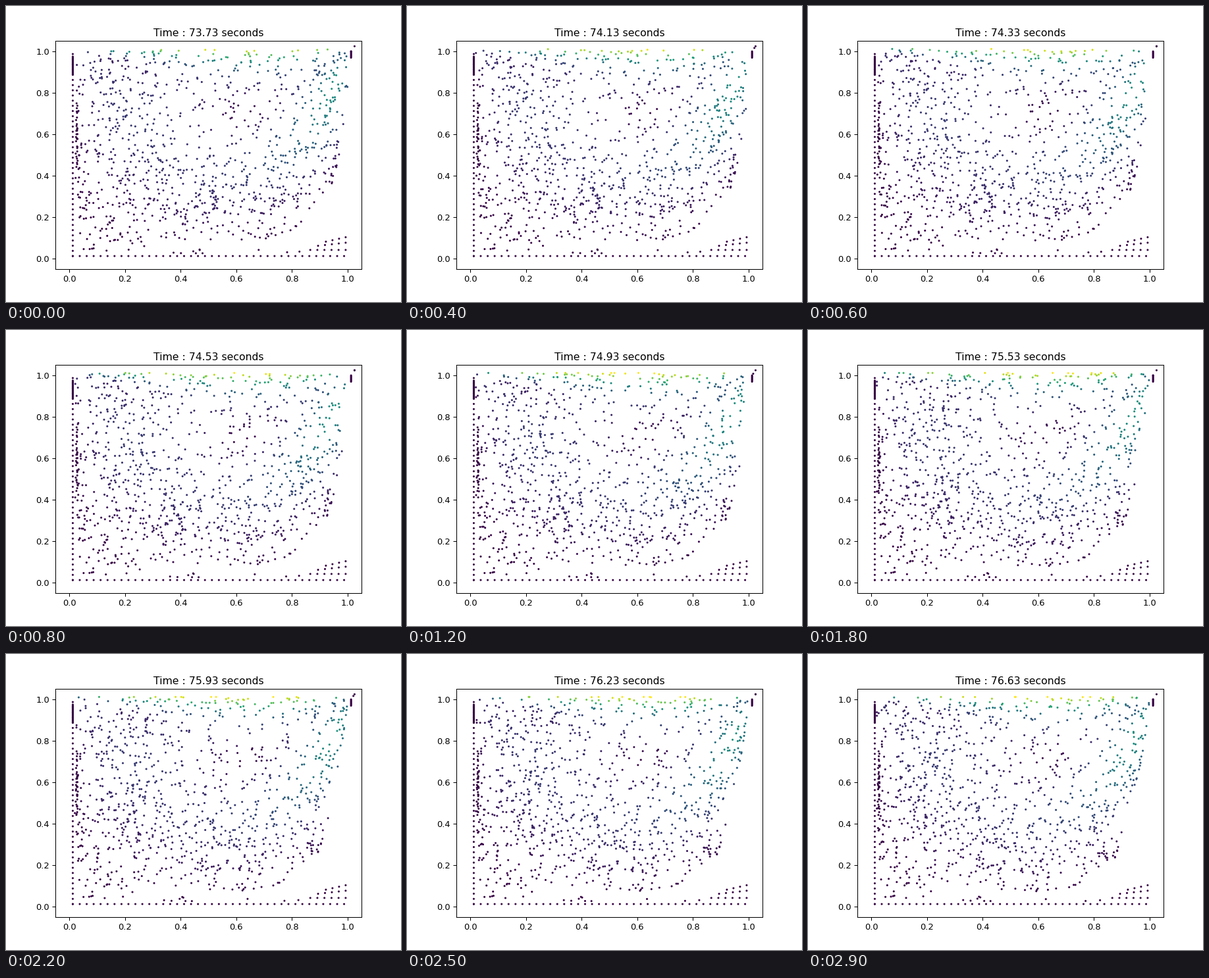
A matplotlib script for the animation above (3000 ms loop, 600 by 450 pixels).

```python
import numpy as np
import matplotlib.pyplot as plt
from matplotlib.animation import FuncAnimation
from matplotlib.colors import ListedColormap

FRAMES, INTERVAL = 30, 100
START_TIME, STEP = 73.73, 0.1
SIZE = 1.025        # side of the cavity
LID = 0.9           # lid speed, units per second
REYNOLDS = 170
N = 48              # grid cells per side

rng = np.random.default_rng(7)


def solve_cavity(steps=4000, dt=0.006):
    """Stream function and velocity of a unit lid-driven cavity."""
    h = 1 / N
    k = np.arange(1, N)
    sines = np.sin(np.pi * np.outer(k, k) / N)
    lam = (2 - 2 * np.cos(np.pi * k / N)) / h**2
    inverse = (2 / N) ** 2 / (lam[:, None] + lam[None, :])
    psi = np.zeros((N + 1, N + 1))
    w = np.zeros_like(psi)
    for _ in range(steps):
        psi[1:-1, 1:-1] = sines @ ((sines @ w[1:-1, 1:-1] @ sines) * inverse) @ sines
        w[0] = -2 * psi[1] / h**2
        w[-1] = -2 * psi[-2] / h**2 - 2 / h
        w[:, 0] = -2 * psi[:, 1] / h**2
        w[:, -1] = -2 * psi[:, -2] / h**2
        u = (psi[2:, 1:-1] - psi[:-2, 1:-1]) / (2 * h)
        v = -(psi[1:-1, 2:] - psi[1:-1, :-2]) / (2 * h)
        east, west = w[1:-1, 2:], w[1:-1, :-2]
        north, south = w[2:, 1:-1], w[:-2, 1:-1]
        mid = w[1:-1, 1:-1]
        spread = (east + west + north + south - 4 * mid) / (REYNOLDS * h**2)
        carry = (u * (east - west) + v * (north - south)) / (2 * h)
        w[1:-1, 1:-1] = mid + dt * (spread - carry)
    full_u, full_v = np.zeros_like(psi), np.zeros_like(psi)
    full_u[1:-1, 1:-1], full_v[1:-1, 1:-1] = u, v
    full_u[-1, 1:-1] = 1
    return psi / psi.min(), full_u, full_v


def sample(field, pos):
    """Bilinear lookup at positions in plot units."""
    q = np.clip(pos / SIZE, 0, 0.99999) * N
    i = q.astype(int)
    fx, fy = (q - i).T
    x, y = i.T
    low = field[y, x] * (1 - fx) + field[y, x + 1] * fx
    high = field[y + 1, x] * (1 - fx) + field[y + 1, x + 1] * fx
    return low * (1 - fy) + high * fy


PSI, U, V = solve_cavity()


def velocity(pos):
    return LID * np.column_stack([sample(U, pos), sample(V, pos)])


def points(x, y):
    return np.column_stack(np.broadcast_arrays(x, y)).astype(float)


def scatter_box(n, x0, x1, y0, y1):
    return points(rng.uniform(x0, x1, n), rng.uniform(y0, y1, n))


def seed_particles():
    """Random particles, thinned by how far in the vortex they lie."""
    pos = scatter_box(1450, 0.022, 1.0, 0.025, 1.01)
    x, y = pos.T
    psi = sample(PSI, pos)
    keep = np.where(psi > 0.55, 0.4, 0.95)
    keep[psi < 0.1] = 0.7
    keep[(psi < 0.07) & (x < 0.12) & (y > 0.35)] = 0.35
    edge = sample(PSI, points(0.95, [0.4]))[0]
    keep[(psi < edge) & (x > 0.3) & (y < 0.93)] = 0
    keep[(x > 0.82) & (y < 0.14) | (x > 0.3) & (y < 0.08)] = 0
    pos = pos[rng.random(len(pos)) < keep]

    angle = rng.uniform(0, np.pi / 2, 22)
    rim = points(0.68 + 0.28 * np.sin(angle), 0.5 - 0.39 * np.cos(angle))
    rim += rng.normal(0, 0.008, rim.shape)
    return np.vstack([pos, rim,
                      scatter_box(18, 0.03, 0.07, 0.2, 0.75),
                      scatter_box(10, 0.3, 0.85, 0.025, 0.045)])


def trace(pos, substeps=5):
    """Particle positions for every frame."""
    dt = STEP / substeps
    path = [pos]
    for _ in range(FRAMES - 1):
        for _ in range(substeps):
            half = pos + 0.5 * dt * velocity(pos)
            pos = np.clip(pos + dt * velocity(half), 0.02, 1.012)
        path.append(pos)
    return path


def corner_fan():
    """Rows of resting particles that rise towards the right wall."""
    rows = []
    for j in range(3):
        x = np.linspace(0.866 + 0.028 * j, 0.993, 6 - j)
        rows.append(points(x, 0.042 + 0.02 * j + 0.15 * j * (x - x[0])))
    return np.vstack(rows)


def still_particles():
    steps = 0.0125 + 0.025 * np.arange(40)
    return np.vstack([
        points(steps, 0.0125),
        points(0.0125, steps),
        points(0.0125, np.linspace(0.888, 0.975, 30)),
        points(1.0125, np.linspace(0.97, 1.0, 9)),
        points(1.025, [1.025]),
        points(rng.normal(0.027, 0.002, 32), rng.normal(0.59, 0.08, 32)),
        corner_fan()])


def loose_particle(i):
    """One particle that hops from the right-hand pile to the corner."""
    part = np.clip((i % 9 - 2) / 3, 0, 1)
    return points(1.0125 + 0.0125 * part, [1.0 + 0.025 * part])


def muted_viridis():
    t = np.linspace(0, 1, 256)
    colors = plt.get_cmap("viridis")(t)
    colors[:, :3] *= (0.8 + 0.2 * t)[:, None]
    return ListedColormap(colors)


paths = trace(seed_particles())
still = still_particles()

fig, ax = plt.subplots(figsize=(6.4, 4.8), dpi=93.75)
fig.subplots_adjust(bottom=0.1115, top=0.8815)
ax.set_xlim(-0.05, 1.05)
ax.set_ylim(-0.05, 1.05)
title = ax.set_title("")
blank = np.zeros(len(paths[0]) + len(still) + 1)
dots = ax.scatter(blank, blank, s=1.8, c=blank, cmap=muted_viridis(),
                  vmin=0, vmax=1)


def draw(i):
    moving = paths[i]
    speed = np.hypot(*velocity(moving).T) / (0.9 * LID)
    dots.set_offsets(np.vstack([moving, still, loose_particle(i)]))
    dots.set_array(np.concatenate([speed**1.25, np.zeros(len(still) + 1)]))
    title.set_text(f"Time : {START_TIME + STEP * i:.2f} seconds")
    return dots, title


anim = FuncAnimation(fig, draw, frames=FRAMES, interval=INTERVAL,
                     repeat=True, repeat_delay=0, blit=False)
plt.show()
```
